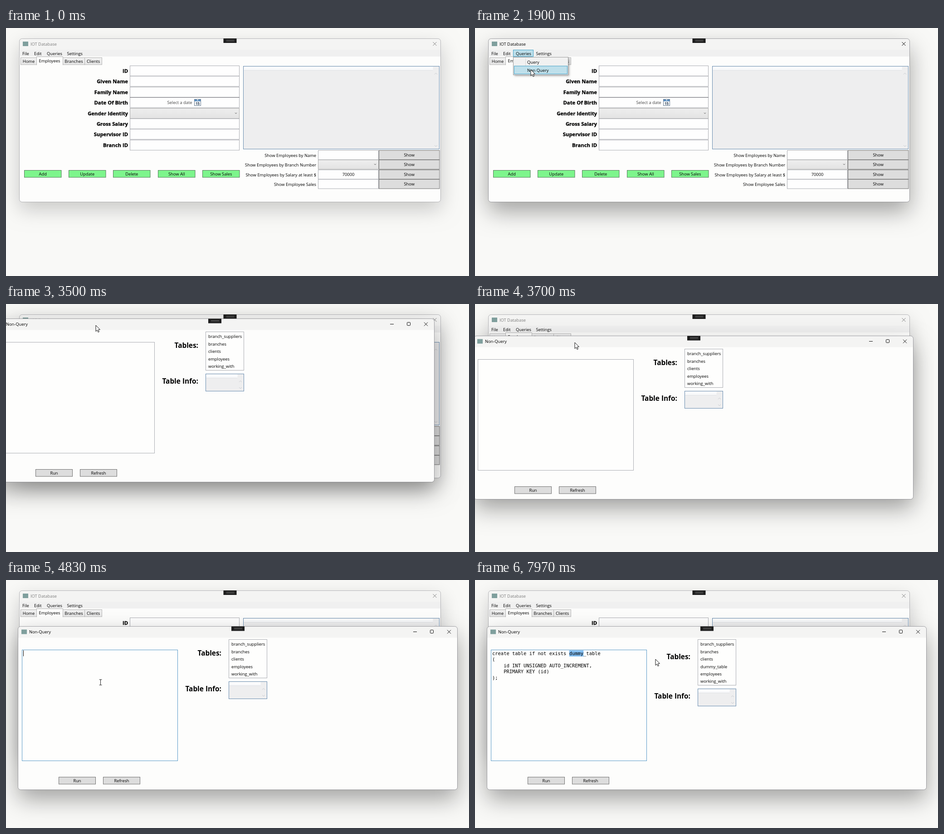
These frames come from a looping animation (1021x548 px, 8000 ms). An HTML page with a canvas:

```html
<!DOCTYPE html>
<html lang="en">
<head>
<meta charset="utf-8">
<title>Database window</title>
<style>
  html, body { margin: 0; width: 100%; height: 100%; overflow: hidden; background: #f9f9f7; }
  canvas { display: block; }
</style>
</head>
<body>
<canvas id="stage" width="1021" height="548"></canvas>
<script>
const ctx = document.getElementById('stage').getContext('2d');
const LOOP = 8000;
const UI = '"Open Sans", "Noto Sans", sans-serif';
const MONO = '"DejaVu Sans Mono", monospace';
const GREY = '#abadb3', BLUE = '#5b9bc8', PANEL = '#fdfdfc', DESKTOP = '#f9f9f7';
const SQL = [
  'create table if not exists dummy_table',
  '(',
  '    id INT UNSIGNED AUTO_INCREMENT,',
  '    PRIMARY KEY (id)',
  ');'
];
const TABLES = ['branch_suppliers', 'branches', 'clients', 'employees', 'working_with'];

// time, x, y
const CURSOR = [
  [30, 330, 556], [330, 260, 330], [470, 260, 330], [1000, 107, 58], [1300, 107, 58],
  [1700, 123, 92], [2550, 123, 92], [2790, 96, -74], [3200, 96, -74]
];
const CURSOR_AFTER_DRAG = [
  [4200, 249, 117], [4300, 249, 117], [4620, 208, 226], [5570, 208, 226], [6050, 157, 440],
  [6630, 157, 440], [7330, 222, 161], [7670, 222, 161], [7970, 398, 175]
];
const DRAG = [
  [3200, -126, -88], [3500, -24, 33], [3700, -2, 71], [4000, 22, 98], [4200, 27, 103]
];
const GRIP = { x: 222, y: 14 };
const T = {
  activate: 1150, menu: 1200, hover: 1560, choose: 2350, open: 2390,
  focus: 4680, paste: 5030, press: 6230, created: 6350, refocus: 7400, select: 7500
};

const clamp = v => Math.max(0, Math.min(1, v));
const ramp = (t, from, length) => clamp((t - from) / length);
const mix = (a, b, p) => a + (b - a) * p;

function along(track, t) {
  let i = 0;
  while (i < track.length - 2 && t > track[i + 1][0]) i++;
  const a = track[i], b = track[i + 1];
  const p = ramp(t, a[0], b[0] - a[0]);
  return { x: mix(a[1], b[1], p), y: mix(a[2], b[2], p) };
}

function box(x, y, w, h, fill, stroke) {
  if (fill) { ctx.fillStyle = fill; ctx.fillRect(x, y, w, h); }
  if (stroke) { ctx.strokeStyle = stroke; ctx.lineWidth = 1; ctx.strokeRect(x, y, w, h); }
}

function line(color, width, ...points) {
  ctx.beginPath();
  points.forEach(([x, y]) => ctx.lineTo(x, y));
  ctx.strokeStyle = color;
  ctx.lineWidth = width;
  ctx.stroke();
}

// y is the middle of the capitals
function text(str, x, y, { align = 'left', size = 9.3, weight = 400, color = '#000', font = UI } = {}) {
  ctx.font = `${weight} ${size}px ${font}`;
  ctx.textAlign = align;
  ctx.fillStyle = color;
  ctx.fillText(str, x, y + size * 0.36);
}

function shade(y, h, top, bottom) {
  const g = ctx.createLinearGradient(0, y, 0, y + h);
  g.addColorStop(0, top);
  g.addColorStop(1, bottom);
  return g;
}

function button(label, x, y, w, h, fill = '#dddddd', stroke = '#707070') {
  box(x, y, w, h, fill, stroke);
  text(label, x + w / 2, y + h / 2 + 0.3, { align: 'center' });
}

function chevron(x, y, dir, color, r = 2) {
  line(color, 1, [x - r, y - dir * r / 2], [x, y + dir * r / 2], [x + r, y - dir * r / 2]);
}

function combo(x, y, w, h) {
  box(x, y, w, h, shade(y, h, '#eeeeee', '#e3e3e3'), '#acacac');
  chevron(x + w - 7.5, y + h / 2 - 0.5, 1, '#555');
}

function dataGrid(x, y, w, h) {
  box(x, y, w, h, '#eeeeef', '#688caf');
  box(x + 1, y + 1, w - 15, 8, shade(y, 9, '#ffffff', '#f6f7f9'));
  line('#e0e2e6', 1, [x + 1, y + 9], [x + w - 14, y + 9]);
  chevron(x + w - 7.5, y + 16.5, -1, '#c9cbcf', 3);
  chevron(x + w - 7.5, y + h - 7, 1, '#c9cbcf', 3);
}

function frame(x, y, w, h, active, titleHeight) {
  ctx.save();
  ctx.beginPath();
  ctx.roundRect(x, y, w, h, 6);
  ctx.shadowColor = `rgba(0,0,0,${mix(0.2, 0.35, active)})`;
  ctx.shadowBlur = mix(44, 50, active);
  ctx.shadowOffsetY = mix(16, 21, active);
  ctx.fillStyle = PANEL;
  ctx.fill();
  ctx.shadowColor = 'transparent';
  ctx.save();
  ctx.clip();
  box(x, y, w, titleHeight, '#f4f4f3');
  ctx.restore();
  ctx.strokeStyle = `rgba(80,80,90,${mix(0.38, 0.5, active)})`;
  ctx.lineWidth = 1;
  ctx.stroke();
  ctx.restore();
}

function caption(title, x, y, color) {
  box(x, y - 5, 12, 10, '#7f9f9d');
  text(title, x + 17, y + 0.5, { color });
}

function closeMark(x, y, color) {
  line(color, 1, [x - 4, y - 4], [x + 4, y + 4]);
  line(color, 1, [x + 4, y - 4], [x - 4, y + 4]);
}

function debugTab(x, y) {
  box(x, y, 29, 10, '#1d1d1d');
  line('#777', 1, [x + 6, y + 4], [x + 24, y + 4]);
  line('#555', 1, [x + 6, y + 6.5], [x + 24, y + 6.5]);
}

function calendar(x, y) {
  box(x + 0.5, y + 0.5, 14, 14, '#f4f6f8', '#6b7f94');
  box(x + 1, y + 1, 13, 4, '#5c8fc0');
  box(x + 6, y + 1, 3, 2, '#e8eef4');
  text('15', x + 7.5, y + 10, { align: 'center', size: 8, weight: 700, color: '#39495c' });
}

function form() {
  const labels = ['ID', 'Given Name', 'Family Name', 'Date Of Birth', 'Gender Identity',
    'Gross Salary', 'Supervisor ID', 'Branch ID'];
  const step = 23.4;
  labels.forEach((label, i) => {
    const y = Math.round(83 + i * step) + 0.5;
    text(label, 269, y + 11.5, { align: 'right', size: 11.3, weight: 700 });
    ctx.strokeStyle = '#000';
    ctx.lineWidth = 0.3;
    ctx.strokeText(label, 269, y + 11.5 + 11.3 * 0.36);
    if (i === 4) combo(273.5, y, 241, 22.5);
    else box(273.5, y, 241, 22.5, '#fefefe', GREY);
  });
  line('#77777c', 1, [273, 153.5], [515, 153.5]);
  text('Select a date', 355.5, 165, { color: '#444' });
  calendar(415, 157);

  ['Add', 'Update', 'Delete', 'Show All', 'Show Sales'].forEach((label, i) =>
    button(label, Math.round(40 + i * 98.2) + 0.5, 314.5, 81.5, 15.5, '#7df58c', '#55795b'));

  dataGrid(523.5, 84.5, 432, 183);

  const queries = ['by Name', 'by Branch Number', 'by Salary at least $'].map(s => 'Show Employees ' + s);
  queries.concat('Show Employee Sales').forEach((label, i) => {
    const y = Math.round(270 + i * 21.3) + 0.5;
    text(label, 684, y + 10.8, { align: 'right' });
    if (i === 1) combo(688.5, y, 133, 20.5);
    else box(688.5, y, 133, 20.5, '#fefefe', GREY);
    button('Show', 822.5, y, 133.5, 20.5);
  });
  text('70000', 755, 323.7, { align: 'center' });
}

function menuBar(open, hover) {
  box(31, 48, 927, 15, '#f0f0f0');
  if (open) box(84.5, 48.5, 44, 14.5, '#bcdfeb', '#45a2c8');
  text('File', 36, 56.3);
  text('Edit', 62, 56.3);
  text('Queries', 90, 56.3);
  text('Settings', 134.5, 56.3);
  if (!open) return;
  ctx.save();
  ctx.shadowColor = 'rgba(0,0,0,.3)';
  ctx.shadowBlur = 4;
  ctx.shadowOffsetX = ctx.shadowOffsetY = 2;
  box(84.5, 64.5, 121, 39, '#f1f1f1');
  ctx.restore();
  box(84.5, 64.5, 121, 39, null, '#999');
  line('#d9d9d9', 1, [111.5, 67], [111.5, 101]);
  if (hover >= 0) box(86.5, 66.5 + hover * 17.5, 117, 17.5, '#bfe0eb', '#45a2c8');
  text('Query', 115, 75.3);
  text('Non Query', 115, 93.5);
}

function tabs() {
  [['Home', 32, 35], ['Branches', 125, 48], ['Clients', 173, 38]].forEach(([label, x, w]) => {
    box(x + 0.5, 65.5, w, 15.5, shade(65, 16, '#f1f1f1', '#e7e7e7'), '#b5b5b5');
    text(label, x + w / 2 + 0.5, 73.5, { align: 'center' });
  });
  box(67.5, 63.5, 58, 18.5, PANEL);
  line('#b5b5b5', 1, [67.5, 82], [67.5, 63.5], [125.5, 63.5], [125.5, 82]);
  text('Employees', 96, 73, { align: 'center' });
}

function mainWindow(t) {
  const active = ramp(t, T.activate, 180) - ramp(t, T.choose, 150);
  const ink = Math.round(mix(125, 0, active));
  const color = `rgb(${ink},${ink},${ink})`;
  frame(29.5, 23.5, 929, 361, active, 26);
  caption('IOT Database', 37, 35, color);
  closeMark(945.5, 35, color);
  tabs();
  form();
  const hover = t < T.hover - 120 ? -1 : t < T.hover ? 0 : 1;
  menuBar(t >= T.menu && t < T.choose, hover);
  debugTab(479.5, 23);
}

function editor(t) {
  const focused = (t >= T.focus && t < T.press) || t >= T.refocus;
  const hovered = t >= 4450 && t < 5700 || t >= 6850 && t < 7700;
  const x = 11, y = 59.3, advance = 6.29, lineHeight = 13.4;
  box(8.5, 51.5, 343, 245, '#fefefd', focused ? BLUE : hovered ? '#8bb9dc' : GREY);
  if (t >= T.select) box(x + 27 * advance, 52.5, 5 * advance, 13.5, '#82bef2');
  const pasted = t >= T.paste;
  if (pasted) SQL.forEach((row, i) =>
    text(row, x, y + i * lineHeight, { size: 10.45, font: MONO }));

  if (!focused || t >= T.select) return;
  const since = t >= T.refocus ? T.refocus : pasted ? T.paste : T.focus;
  if ((t - since) % 1060 >= 530) return;
  const column = t >= T.refocus ? 29 : pasted ? 2 : 0;
  const row = pasted && t < T.refocus ? 4 : 0;
  box(x + column * advance, 52.5 + row * lineHeight, 1, 13, '#000');
}

function queryWindow(t) {
  if (t < T.open) return;
  const pos = along(DRAG, t);
  const p = 1 - (1 - ramp(t, T.open, 220)) ** 3;
  const scale = mix(0.92, 1, p);
  const w = 969, h = 361;
  ctx.save();
  ctx.globalAlpha = p;
  ctx.translate(Math.round(pos.x) + w / 2, Math.round(pos.y) + h / 2);
  ctx.scale(scale, scale);
  ctx.translate(-w / 2, -h / 2);

  frame(-0.5, -0.5, w, h, 1, 25);
  caption('Non-Query', 7, 11.5, '#000');
  line('#111', 1, [871, 11.5], [879, 11.5]);
  ctx.beginPath();
  ctx.roundRect(908.5, 7.5, 7, 7, 1);
  ctx.stroke();
  closeMark(950, 11.5, '#111');
  debugTab(470, -0.5);

  editor(t);
  const over = t >= 5950 && t < 6700;
  const pressed = t >= T.press && t < T.press + 100;
  const fill = pressed ? '#c4e5f6' : over ? '#bee6fd' : '#dddddd';
  button('Run', 89.5, 332.5, 81, 15.5, fill, over ? '#3c7fb1' : '#707070');
  button('Refresh', 187.5, 332.5, 81, 15.5);

  const rows = TABLES.slice();
  if (t >= T.created) rows.splice(3, 0, 'dummy_table');
  const extra = (rows.length - TABLES.length) * 16.4;
  const heading = { align: 'right', size: 15.4, weight: 700 };
  text('Tables:', 448, 58 + extra / 2, heading);
  box(464.5, 28.5, 84, Math.round(85 + extra), '#fefefd', GREY);
  rows.forEach((name, i) => text(name, 470, 39 + i * 16.4));
  text('Table Info:', 448, 137.5 + extra, heading);
  dataGrid(464.5, 121.5 + Math.round(extra), 84, 38);
  ctx.restore();
}

function arrow(x, y) {
  ctx.beginPath();
  [[0, 0], [0, 13.5], [3.1, 10.7], [5.2, 15.4], [7.4, 14.4], [5.4, 9.9], [9.4, 9.6]]
    .forEach(([dx, dy]) => ctx.lineTo(x + dx, y + dy));
  ctx.closePath();
  ctx.fillStyle = '#fff';
  ctx.fill();
  ctx.strokeStyle = '#111';
  ctx.lineWidth = 1;
  ctx.stroke();
}

function beam(x, y) {
  line('#222', 1, [x + 0.5, y - 6], [x + 0.5, y + 6]);
  [-6, 6].forEach(d => line('#222', 1, [x - 2.5, y + d], [x + 3.5, y + d]));
}

function pointer(t) {
  if (t < 30) return;
  let p;
  if (t < 3200) p = along(CURSOR, t);
  else if (t < 4200) {
    const win = along(DRAG, t);
    p = { x: win.x + GRIP.x, y: win.y + GRIP.y };
  } else p = along(CURSOR_AFTER_DRAG, t);
  const x = Math.round(p.x), y = Math.round(p.y);
  const overEditor = t > 4200 && x > 35 && x < 379 && y > 154 && y < 400;
  (overEditor ? beam : arrow)(x, y);
}

function draw(t) {
  box(0, 0, 1021, 548, DESKTOP);
  mainWindow(t);
  queryWindow(t);
  pointer(t);
}

const start = performance.now();
function tick() {
  draw((performance.now() - start) % LOOP);
  requestAnimationFrame(tick);
}
tick();
</script>
</body>
</html>
```
